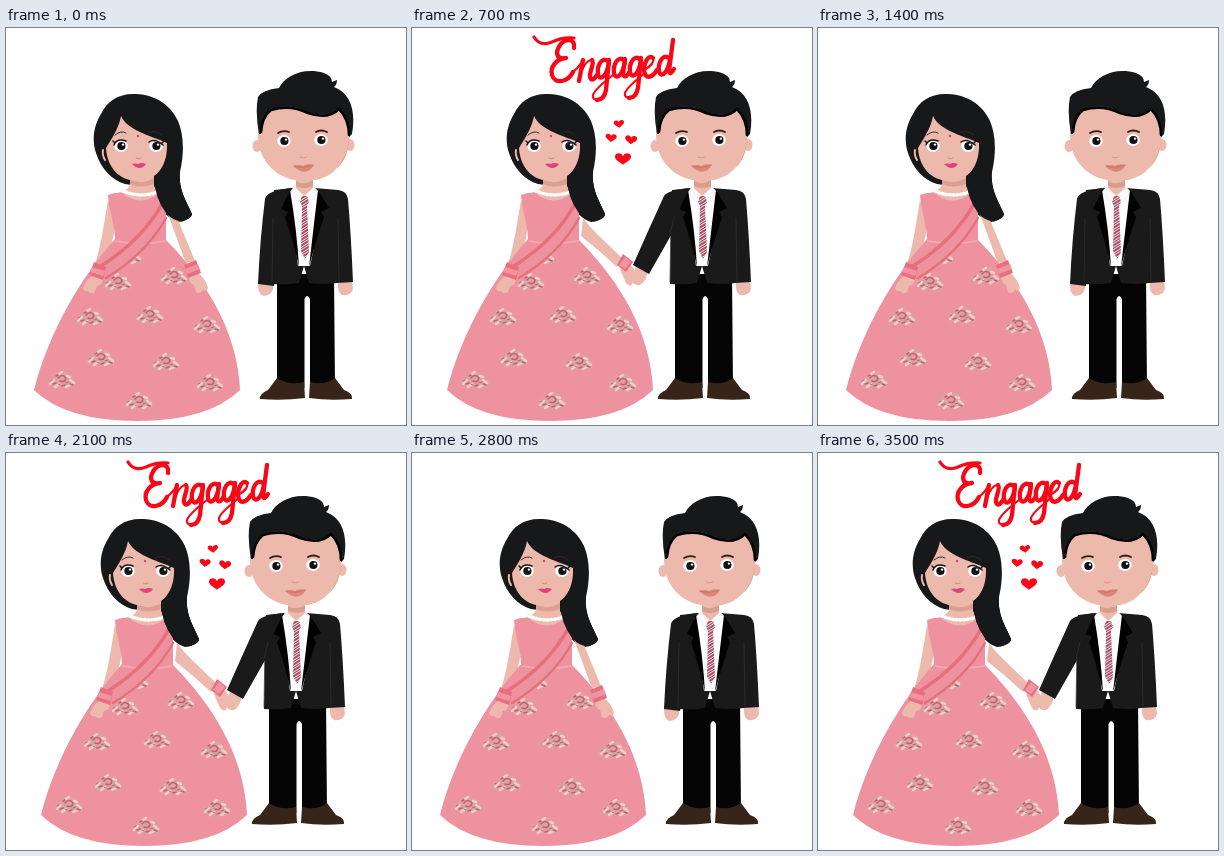
These frames come from a looping animation (400 px wide and 397 px high, 4200 ms). An HTML page:

```html
<!DOCTYPE html>
<html lang="en">
<head>
<meta charset="utf-8">
<title>Engaged</title>
<style>
  html, body { margin: 0; width: 100%; height: 100%; overflow: hidden; background: #fff; }
  svg { display: block; width: 400px; height: 397px; }
  .her, .him, .apart, .together { animation: 1.4s step-end infinite; }
  .her { animation-name: her; }
  .him { animation-name: him; }
  .apart { animation-name: hide; }
  .together { animation-name: show; }
  @keyframes her { 50%, 100% { transform: translate(7px, 0); } }
  @keyframes him { 50%, 100% { transform: translate(-8px, 0); } }
  @keyframes hide { 0% { opacity: 1; } 50%, 100% { opacity: 0; } }
  @keyframes show { 0% { opacity: 0; } 50%, 100% { opacity: 1; } }
  .skin { fill: #edb9ad; }
  .hair { fill: #171819; }
  .dress { fill: #ee929f; }
  .trim { fill: #e96f80; }
  .suit { fill: #1a1a1b; }
  .line { fill: none; stroke-linecap: round; stroke-linejoin: round; }
  .thick { stroke-width: 4.3; }
  .thin { stroke-width: 2.2; }
</style>
</head>
<body>
<svg viewBox="0 0 400 397">
  <defs>
    <g id="flower">
      <path d="M-14 4Q-15-2-9-2Q-9-7-4-7Q0-11 5-7Q10-7 9-2Q14-2 14 4Q13 9 8 7Q3 10-1 7Q-8 10-14 4Z" fill="#dda0a4"/>
      <path d="M-12 4l4-4M-7 7l4-3M8 0l4 3M4 7l4-2M-3-6l3-2M5-4l3 1" class="line" stroke="#f1cdc9" stroke-width="2.4"/>
      <path d="M-4-2q4-5 8 0q-1 5-6 3M-9 4l3-1M8 4l3 1M0 6l3-1M-6-4l2-1" class="line" stroke="#c2606d" stroke-width="1.5"/>
      <path d="M-12 1l2-1M4 3l3-1M-4 4l2 1" class="line" stroke="#937a72"/>
    </g>
    <g id="eye">
      <ellipse rx="6.8" ry="6" fill="#fff"/>
      <circle cx=".4" r="4.1" fill="#111"/>
      <circle cx="2" cy="-1.4" r="1.2" fill="#fff"/>
    </g>
    <path id="heart" d="M0 5C-2 3-7 1-7-2C-7-6-1-6 0-2.5C1-6 7-6 7-2C7 1 2 3 0 5Z" fill="#fb0717"/>
    <path id="bowl" class="thick" d="M11 3C4-2 0 9 1 16C3 24 10 18 12 4"/>
    <g id="g">
      <use href="#bowl"/>
      <path class="thick" d="M12 2L9 32Q7 42 0 42"/>
      <path class="thin" d="M0 42Q-5 41-4 37Q-2 31 16 17"/>
    </g>
    <pattern id="stripes" width="5" height="5" patternUnits="userSpaceOnUse" patternTransform="rotate(-32)">
      <path d="M0 0H5V5H0Z" fill="#eee6e6"/>
      <path d="M0 1H5" stroke="#d63c4e" stroke-width="2"/>
      <path d="M0 3.5H5" stroke="#4c5a7c" stroke-width="1.1"/>
    </pattern>
  </defs>

  <g class="her">
    <path class="hair" d="M130 66C113 65 101 73 95 86C87 99 86 113 90 125C95 141 106 152 119 156L147 160C149 175 159 190 172 194Q181 194 186 186C180 172 172 162 174 144C179 122 177 105 172 93C165 78 151 67 130 66Z"/>
    <path class="skin" d="M124 147H148V158Q151 164 159 167L153 179H112L104 167Q124 163 124 156Z"/>
    <path d="M124 151Q134 158 148 150V156Q134 161 124 156Z" fill="#dca093"/>
    <path class="line" d="M97 122Q96 127 99 132" stroke="#edb9ad" stroke-width="2"/>
    <path class="skin" d="M115 88C121 102 143 107 161 115C162 137 151 153 132 153C113 153 101 139 100 120C105 112 113 100 115 88Z"/>
    <path class="line" d="M117 163Q135 171 154 163" stroke="#f4eee5" stroke-width="4" stroke-dasharray=".1 3.7"/>
    <path class="line" d="M117 163Q135 171 154 163" stroke="#fff" stroke-width="2.5"/>
    <use href="#eye" x="115" y="118"/>
    <use href="#eye" x="150" y="118"/>
    <path class="line" d="M108 117Q111 110 120 113M143 114Q149 110 157 117M109 115l-2-2M156 115l2-2" stroke="#151515" stroke-width="1.5"/>
    <path class="line" d="M109 107Q115 102 120 105M142 105Q149 101 156 107" stroke="#3a2724" stroke-width="1"/>
    <circle cx="132" cy="108" r="1.2" fill="#df416b"/>
    <path class="line" d="M130 130Q132 132 135 130" stroke="#d4897d"/>
    <path d="M126 136Q130 135 132 136Q135 134 140 136Q134 144 126 136Z" fill="#df4379"/>

    <path class="skin" d="M102 172C98 196 95 218 89 236L98 240C104 222 109 207 109 194Z"/>
    <path class="skin apart" d="M160 182C168 201 174 220 180 235L189 233C182 216 176 202 171 189Z"/>
    <path class="dress" d="M102 167Q110 164 116 165Q135 180 153 165L160 169L160 212C181 233 200 258 212 282C225 307 233 335 234 362Q202 393 131 393Q60 393 28 362C43 303 76 248 109 211C109 197 103 183 102 167Z"/>
    <path d="M110 213Q134 218 159 213" class="line" stroke="#f3aab2" stroke-width="1.3"/>
    <use href="#flower" x="122" y="228"/>
    <use href="#flower" x="112" y="254"/>
    <use href="#flower" x="168" y="248"/>
    <use href="#flower" x="84" y="289"/>
    <use href="#flower" x="144" y="287"/>
    <use href="#flower" x="201" y="297"/>
    <use href="#flower" x="95" y="330"/>
    <use href="#flower" x="160" y="334"/>
    <use href="#flower" x="56" y="352"/>
    <use href="#flower" x="133" y="373"/>
    <use href="#flower" x="204" y="355"/>
    <path class="dress" d="M155 174L160 189Q139 224 100 251L95 240Q134 212 155 174Z"/>
    <path class="line" d="M156 176Q136 212 95 238" stroke="#e66f7c" stroke-width="3.6"/>
    <path class="line" d="M160 190Q141 225 100 250" stroke="#e66f7c" stroke-width="2.4"/>
    <path class="skin" d="M88 247L97 250Q97 257 91 258L89 264Q85 267 82 263Q78 264 77 260Q80 251 88 247Z"/>
    <path class="trim" d="M88 234L100 239L97 252L83 247Z"/>
    <path d="M86 239L99 243L97 248L84 244Z" fill="#f194a1"/>
    <g class="apart">
      <path class="skin" d="M183 247L191 244Q200 251 202 260Q201 264 197 262Q194 267 190 264L188 257Q183 256 183 247Z"/>
      <path class="trim" d="M178 237L190 232L195 245L182 250Z"/>
      <path d="M179 241L192 236L194 241L181 246Z" fill="#f194a1"/>
    </g>
    <path class="hair" id="lock" d="M148 151Q149 170 160 185Q171 197 182 191Q186 189 186 186C180 172 172 162 174 140Z"/>
  </g>

  <g class="him">
    <path d="M271 246H328L329 360H304V271Q301 265 298.500 271V360H271Z" fill="#050505"/>
    <path d="M271 350Q283 358 298 354L299 370Q277 373 254 371Q253 366 262 362ZM304 354Q318 358 329 350L338 362Q347 365 346 371Q323 373 303 370Z" fill="#38251a"/>
    <path class="skin" d="M332 252H346L347 261Q345 268 336 267Q331 265 332 252Z"/>
    <g class="apart">
      <path class="skin" d="M252 252H267V261Q265 268 257 268Q251 266 252 252Z"/>
      <path class="suit" d="M287 160Q261 162 259 171Q254 211 252 256L268 258L278 186Z"/>
    </g>
    <path class="suit" d="M288 160L268 162L267 197L266 256Q281 257 293 255L298 238L303 255Q320 257 331 255L347 254Q345 206 342 171Q341 163 332 162L308 160Z"/>
    <path d="M289 159L282 166Q288 207 292 238H304Q312 205 314 166L307 159Z" fill="#fff"/>
    <path class="skin" d="M290 147H307V160L298 168L290 160Z"/>
    <path d="M290 153Q299 158 307 152V158Q298 162 290 158Z" fill="#d99e8b"/>
    <path d="M288 159L298 168L292 174L284 164ZM308 159L299 168L305 174L313 164Z" fill="#fafafa" stroke="#e2e2e2" stroke-width=".5"/>
    <path d="M296 168H301L303 174L301 178L303 224L299 231L295 223L296 178L294 174Z" fill="url(#stripes)"/>
    <path d="M284 162L275 181L282 184L279 189Q288 216 293 239Q291 203 284 162ZM312 162L323 180L315 184L318 189Q309 216 303 239Q307 204 312 162Z" fill="#020202"/>
    <path d="M267 190L266 254M332 190L333 253" class="line" stroke="#343435" stroke-width=".7"/>

    <ellipse class="skin" cx="251" cy="118" rx="4.500" ry="6"/>
    <ellipse class="skin" cx="344" cy="117" rx="4.500" ry="6"/>
    <path d="M342 99Q349 147 298 153Q328 152 337 130Z" fill="#d6a16d"/>
    <path class="skin" d="M256 72H340Q347 92 343 113C339 139 322 153 299 153C271 153 252 133 252 107Q252 86 256 72Z"/>
    <path class="hair" d="M253 106Q249 84 252 69Q256 62 273 60C279 48 297 39 318 45Q326 48 326 54L331 52Q331 57 328 59C345 65 350 84 346 106L343 109Q344 92 333 80Q322 91 302 84Q284 75 265 81Q256 89 255 106Z"/>
    <path class="line" d="M255 104Q256 89 265 82Q284 76 302 85Q322 92 333 81Q343 91 343 107" stroke="#020202" stroke-width="2.6"/>
    <use href="#eye" x="278" y="113"/>
    <use href="#eye" x="315" y="112"/>
    <path class="line" d="M272 105Q277 102 283 104M310 104Q315 101 321 104" stroke="#2b1d19" stroke-width="1.8"/>
    <path class="line" d="M294 129Q297 131 301 129" stroke="#d9988a"/>
    <path d="M287 138Q293 136 297 138Q301 135 308 137Q300 150 287 138Z" fill="#de8579"/>
    <path class="line" d="M288 138Q298 141 307 137" stroke="#c26c64" stroke-width=".7"/>
  </g>

  <g class="together">
    <path class="skin" d="M171 190Q176 197 186 207L211 231L205 239Q188 223 169 208Z"/>
    <path class="skin" d="M214 235Q223 238 223 246L220 257Q216 259 213 253L208 241Z"/>
    <path class="trim" d="M211 226L221 234L214 244L205 237Z"/>
    <path d="M213 229L219 234L213 241L207 237Z" fill="#f194a1"/>
    <path class="skin" d="M224 238L236 243Q234 254 228 257Q222 258 219 252Z"/>
    <path class="suit" d="M278 160Q256 162 252 168Q236 203 221 237L237 246L262 202L269 177Z"/>
    <path class="line" d="M262 189L258 206" stroke="#343435" stroke-width=".7"/>
    <use href="#lock" class="hair" x="7"/>

    <g class="line" stroke="#f80716" role="img" aria-label="Engaged">
      <path class="line" stroke-width="3.2" d="M122 9Q128 19 140 14Q150 9 162 10"/>
      <path class="thick" d="M162 20C164 10 153 10 148 17C142 26 146 32 154 30C144 31 138 39 140 47C143 57 156 54 161 44M171 32L167 53M180 32C183 35 177 44 178 49Q180 55 185 47"/>
      <path class="thin" d="M161 44Q168 38 171 32M168 48Q173 32 180 32"/>
      <use href="#g" x="185" y="30"/>
      <use href="#bowl" x="201" y="29"/>
      <path class="thick" d="M213 31L211 46Q213 52 218 43"/>
      <use href="#g" x="217" y="28"/>
      <path class="thin" d="M232 42Q243 36 241 30"/>
      <path class="thick" d="M241 30C237 26 232 34 232 42C233 52 240 50 245 42"/>
      <use href="#bowl" x="246" y="27"/>
      <path class="thick" d="M261 12L257 43Q258 48 262 41"/>
    </g>
    <use href="#heart" transform="translate(207 96) rotate(-6) scale(.75)"/>
    <use href="#heart" transform="translate(199 110) rotate(6) scale(.8)"/>
    <use href="#heart" transform="translate(219 112) rotate(6) scale(.85)"/>
    <use href="#heart" transform="translate(211 131) scale(1.150)"/>
  </g>
</svg>
</body>
</html>
```
